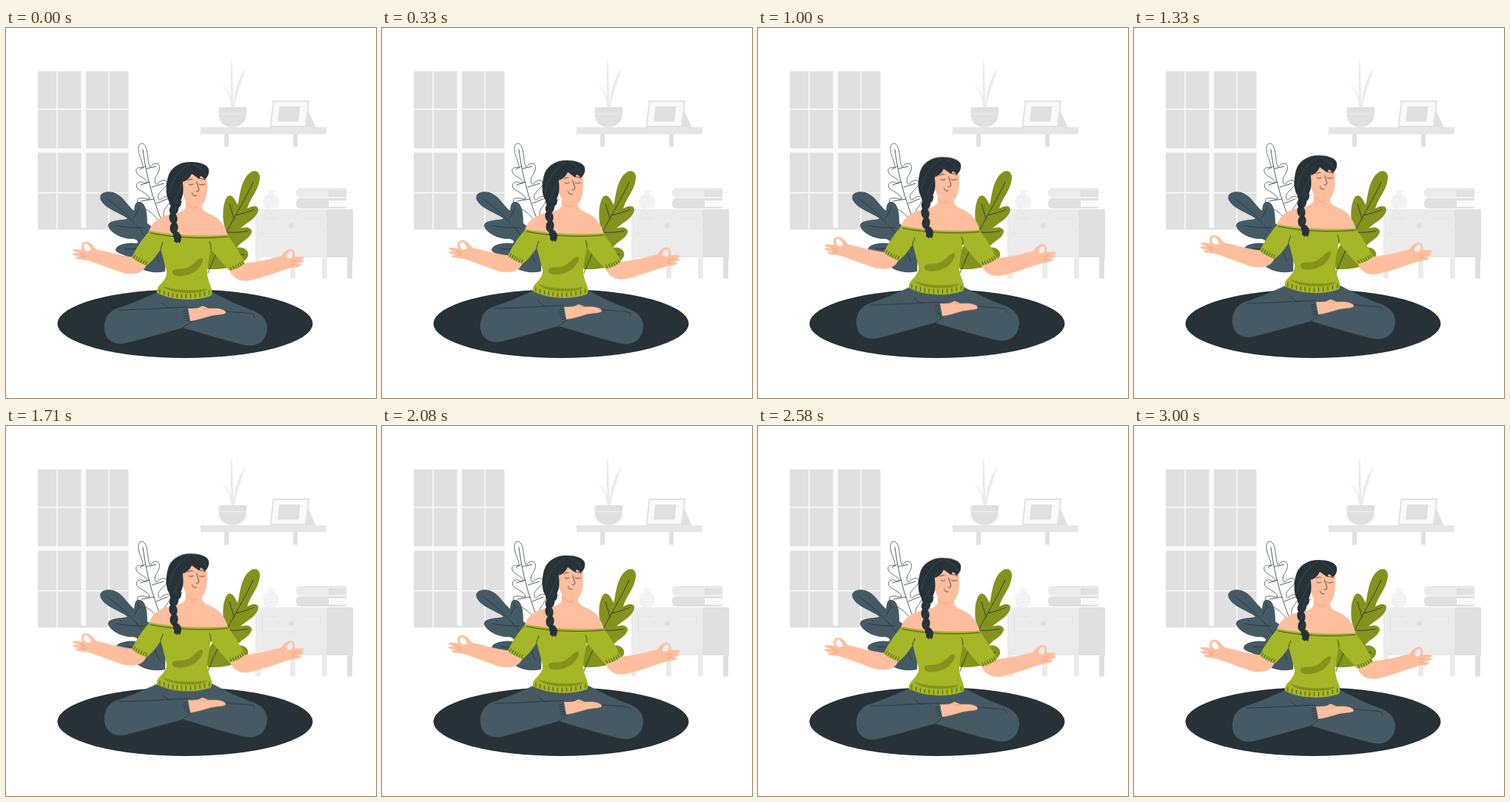
These frames come from a looping animation (500x500 px, 3040 ms). An HTML page:

```html
<!DOCTYPE html>
<html lang="en">
<head>
<meta charset="utf-8">
<title>Meditation</title>
<style>
  html, body { margin: 0; width: 100%; height: 100%; overflow: hidden; background: #fff; }
  svg { display: block; width: 100vw; height: 100vh; }
  .ink { fill: none; stroke: #263238; stroke-width: .8; stroke-linecap: round; stroke-linejoin: round; }
  .hair { fill: #263238; }
  .strand { fill: none; stroke: #455a64; stroke-width: .6; stroke-linecap: round; }
  .skin { fill: #ffbe9d; }
  .crease { fill: none; stroke: #eb996e; stroke-width: .8; stroke-linecap: round; }
  .pants { fill: #455a64; }
  .top { fill: #a5b626; }
  .shade { fill: #84921e; }
</style>
</head>
<body>
<svg viewBox="0 0 500 500">
  <!-- window -->
  <path fill="#e0e0e0" d="M43 58.500H165.500V272.500H43Z"/>
  <g fill="#fafafa">
    <path d="M101.500 58H108V270H101.500ZM43 162.500H165.500V168.500H43Z"/>
    <path d="M68.300 58H69.900V273H68.300ZM138.300 58H139.900V273H138.300ZM43 109H165.500V110.500H43ZM43 222H165.500V223.500H43Z"/>
  </g>

  <!-- shelf -->
  <path fill="#e6e6e6" d="M263 134H433V143.500H263Z"/>
  <path fill="#e0e0e0" d="M295 143.500H301V160.500H295ZM388 143.500H394V160.500H388Z"/>
  <g fill="#ebebeb">
    <path d="M305 108C303 88 303 60 305 37C306.500 60 307 88 307.500 108Z"/>
    <path d="M304 108C304 96 299 85 291.500 77C300 82 306 95 307 108Z"/>
    <path d="M306 108C309 86 313 69 323.500 54C319 72 311 90 308.500 108Z"/>
  </g>
  <path fill="#e0e0e0" d="M287.500 107H325V116C325 127 317 134 306 134C295 134 287.500 127 287.500 116Z"/>
  <path d="M288 115.800H324.500" stroke="#f0f0f0"/>
  <path fill="#e0e0e0" d="M408 110L418.500 134H404Z"/>
  <path fill="#fafafa" stroke="#e3e3e3" stroke-width="2.200" d="M361.500 99H409L405 133H357.500Z"/>
  <path fill="#e0e0e0" d="M369.500 106H397.500L395.500 126.500H367Z"/>

  <!-- cabinet -->
  <path fill="#ebebeb" d="M337 245H433V310H434V338.500H427V310H391V338.500H384V310H344V338.500H337Z"/>
  <path fill="#e0e0e0" d="M433 245H469V310H468V338.500H461V310H433Z"/>
  <path fill="none" stroke="#e0e0e0" stroke-width=".8" d="M366 257H346.500V278H392M404 257H425.500V270"/>
  <circle cx="385.500" cy="267" r="3.500" fill="#dedede"/>
  <path fill="#f3f3f3" d="M352 219.500H365C362 222 362 223 362 224.500A11 11 0 1 1 354 224.500C354 223 354 221.500 352 219.500Z"/>
  <path fill="#ebebeb" d="M460 216H398C394 216 392 219 392 222.500S394 229.500 398 229.500H460Z"/>
  <path fill="#e0e0e0" d="M436 219H460V228H436ZM460 230H398C394 230 392 233 392 237S394 244 398 244H460Z"/>
  <path fill="#fafafa" d="M436 233H460V241.500H436Z"/>

  <ellipse cx="242" cy="399.500" rx="172.500" ry="46.500" fill="#263238"/>

  <!-- leaves -->
  <path fill="#fff" stroke="#263238" stroke-width=".7" d="M213 268C203 256 196 248 186 243C178 239 174 231 181 230C186 229 190 232 194 231C192 224 185 222 179 218C173 213 178 207 183 208C187 209 189 211 191 209C188 202 181 202 177 196C173 190 179 187 185 189C186 183 180 175 179 165C178 157 184 153 188 159C192 166 191 178 194 187C196 189 198 182 204 183C211 186 206 196 202 202C200 207 202 211 204 211C209 205 217 204 217 209C218 216 209 219 206 225C205 231 207 234 210 231C215 226 224 226 222 233C219 241 212 245 213 252Z"/>
  <path class="ink" stroke-width=".6" d="M185 164C188 190 196 226 211 262M188 187L181 191M190 190L203 187M194 208L182 212M197 215L213 210M200 231L183 234M203 237L218 231"/>

  <path class="pants" d="M215 329C196 333 178 327 169 313C162 305 150 306 148 300C148 293 164 289 176 291C180 290 178 286 172 285C158 286 141 277 138 268C137 260 152 260 164 258C160 252 136 246 129 234C123 224 134 219 145 222C158 226 163 239 173 247C174 239 175 234 181 235C190 237 191 253 191 264C198 270 214 275 216 296Z"/>
  <path class="ink" d="M137 231C162 250 190 274 207 316M172 257C176 252 179 246 180 241M150 267C162 270 174 270 186 270M160 298C174 300 188 297 199 294"/>

  <path class="shade" d="M273 326C266 304 281 289 297 273C291 258 293 235 299 228C305 223 309 231 313 239C316 230 316 210 327 198C334 190 344 192 343 204C341 220 329 231 326 244C332 240 340 239 341 245C340 257 326 262 317 271C324 268 333 270 332 276C328 287 317 288 312 297C320 295 329 300 327 308C323 320 299 327 273 326Z"/>
  <path class="ink" d="M334 208C322 236 294 276 273 331M308 259C307 252 304 245 302 238M311 253C320 251 329 248 335 245M299 276C309 277 319 276 327 274M286 302C300 306 311 307 321 306"/>

  <g id="figure">
    <!-- arms -->
    <path class="skin" fill-rule="evenodd" d="M171 309.500C152 307 136 302 122 299C118 295 115 290 110 289C105 288 102 291 102 296C103 299 103 300 103 300C98 299 93 298.500 90 299.500C89 301 92 302 100 304.500C96 304 92 303.500 90 304.500C89 306.500 95 308 101 309C97 309 94 309 94 310.500C95 313 103 313 110 314C126 319 143 326 158 331C173 334 185 332 190 320ZM106 299C104.500 294 106 291 108 291C111 292 114 296 115 300C112 302 108 302 106 299Z"/>
    <path class="crease" d="M101 304.500L107 305.500M102 309L107 309.500"/>
    <path class="skin" fill-rule="evenodd" d="M322 318C343 316 360 311 372 308C375 304 379 299 384 298.500C389 299 391 303 390 309C395 309 400 308.500 403 310C403 312 398 313.500 392 314.500C397 313.500 401 313 402.500 314.500C402 317 396 318 391 319C395 318.500 399 318.500 399 320C398 323 390 323 382 325C363 331 345 338 328 341.500C314 343 305 337 302 326ZM379 309C379 305 382 302 385 301C388 302 388 306 387 309C385 312 381 312 379 309Z"/>
    <path class="crease" d="M392 314.500L386 315.500M391 319L386 319.500"/>

    <!-- legs -->
    <path class="pants" d="M206 356C186 366 165 374 150 379C136 384 132.500 396 133 407C134 421 145 429 161 426C187 420 216 411 239 405C270 414 305 425 326 429C343 431 353.500 419 353 404C352 392 344 385 329 380C309 373 291 363 277 356Z"/>
    <path class="ink" d="M152 381C183 381 215 378 246 377M239 405C243 402 247 399 251 396M211 371C214 375 218 378 222 379M296 383C312 384 327 385 333 386C335 387 336 389 336 391"/>
    <path class="skin" d="M246 379C254 379 261 379 264 376C268 375 270 378 274 379C284 378 295 379 297 384C297 388 286 387 277 389C267 392 257 395 249 396Z"/>
    <path class="crease" d="M264 378C267 380 271 380 274 379"/>

    <!-- neck and shoulders -->
    <path class="skin" d="M193 275C197 262 208 255 222 252C235 249 243 248 243 239V218H265V242C266 248 272 250 279 253C290 258 297 269 300 281C270 288 225 285 193 275Z"/>

    <!-- sweater -->
    <path class="top" d="M194 274C224 280 266 282 299 279.500C308 291 317 305 323 318C317 323 310 326 302 328C294 320 284 308 277 299C274 312 272 325 272 333C273 341 276 347 278 353C279 357 278 360 277 362C254 370 224 368 204 358C203 354 205 350 208 347C214 341 218 335 217 329C214 318 211 305 209 299C204 307 197 316 190 321C182 318 175 315 170 310C176 297 185 284 194 274Z"/>
    <path class="shade" d="M225 328C230 324 239 327 247 323C255 319 258 312 264 311C269 312 264 322 257 328C246 336 227 338 225 331Z"/>
    <path class="shade" d="M211 348C227 355 255 356 272 352C268 357 257 358 246 358C232 358 216 355 211 348Z"/>
    <path class="ink" d="M195 277C228 284 270 285 299 282M277 299C277 294 276 291 275 289M209 299C209 296 211 293 212 290"/>
    <path id="ticks" class="ink"/>

    <!-- head -->
    <path class="crease" d="M244 237C248 243 253 245 258 242"/>
    <path class="skin" d="M240 197H271C273 211 272 227 268 235C265 241 259 243 253 241C246 238 241 233 239 224Z"/>
    <path class="ink" d="M247 211C248 212.500 251 212.500 253 211M261 211C263 212.500 266 212.500 268.500 211M257.500 208C259 213 261 217 260.500 220C260 221 258 221 257 221M251.500 223C252 226 254 227.500 257 226.500"/>
    <path class="ink" stroke-width="1.300" d="M246 206C248 204.500 250 204 252 204.500M262 203.500C265 203.500 267 204 269 205.500"/>
    <path class="hair" d="M240 233C233 238 225 240 220 234C215 225 216 209 220 198C225 187 236 181 249 181C261 181 272 184 274 191C275 198 272 202 268 205C267 202 265 201 263 200C262 202 262 203 261 204C257 201 254 199 251 197C248 203 245 206 239 208C240 220 240 227 235 235Z"/>
    <g id="braid" class="hair"></g>
    <path class="strand" d="M249 183C236 190 224 204 221 223M244 198C237 207 235 220 226 235M253 184C260 187 267 192 270 199"/>
  </g>
</svg>
<script>
  const LOOP = 3040, RISE = 1500, LAND = 3000, HEIGHT = 10;
  const byId = id => document.getElementById(id);

  // Ribbing: short strokes spread along a quadratic curve.
  function ribs([x0, y0], [cx, cy], [x1, y1], count, dx, dy) {
    let d = '';
    for (let i = 0; i < count; i++) {
      const t = (i + .5) / count, u = 1 - t;
      const x = u * u * x0 + 2 * u * t * cx + t * t * x1;
      const y = u * u * y0 + 2 * u * t * cy + t * t * y1;
      d += `M${x} ${y}l${dx} ${dy}`;
    }
    return d;
  }
  byId('ticks').setAttribute('d',
    ribs([205, 357], [239, 372], [278, 359], 12, 0, -5) +
    ribs([171, 310], [180, 317], [190, 320], 6, 2, -4) +
    ribs([303, 327], [314, 325], [322, 318], 6, -2, -4) +
    ribs([245, 380], [244, 389], [249, 396], 5, -5, 1));

  // Braid: overlapping lobes with a loose tuft at the end.
  const lobes = [[229, 236, 8, 8, 25], [227, 245, 6, 8, 20], [226, 257, 5.5, 8, -12],
                 [227, 270, 5.5, 8, 8], [231, 281, 5, 6.5, -25]];
  byId('braid').innerHTML = lobes.map(([x, y, rx, ry, turn]) =>
    `<ellipse cx="${x}" cy="${y}" rx="${rx}" ry="${ry}" transform="rotate(${turn} ${x} ${y})"/>` +
    `<path class="strand" d="M${x - 3} ${y + 5}q4 -2 6 -8"/>`).join('') +
    '<path d="M228 280L236 279C238 284 236 288 235 291L232 289L231 291L227 288Z"/>';

  const at = (time, y) => ({ offset: time / LOOP, transform: `translateY(${y}px)` });
  byId('figure').animate([at(0, 0), at(RISE, -HEIGHT), at(LAND, 0), at(LOOP, 0)],
    { duration: LOOP, iterations: Infinity, easing: 'linear' });
</script>
</body>
</html>
```
